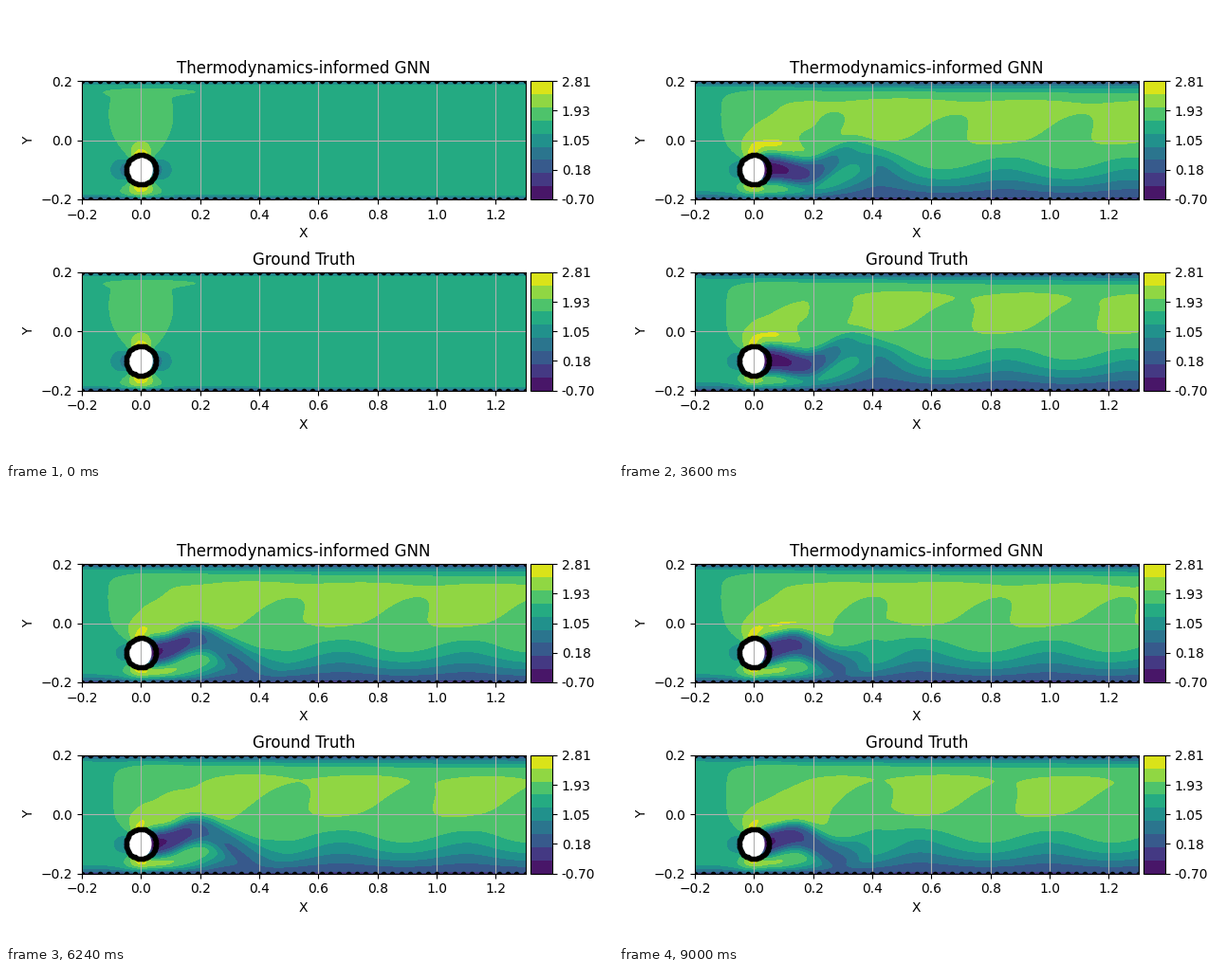
A matplotlib script that plays this animation: 640 by 480 pixels, repeating every 9030 ms.

```python
import numpy as np
import matplotlib.pyplot as plt
from matplotlib.animation import FuncAnimation
from matplotlib.colors import ListedColormap
from matplotlib.patches import Ellipse

W, H, DPI = 640, 480, 100
FRAMES, STEP = 301, 30
VMIN, VMAX, BANDS = -0.70, 2.81, 9
PERIOD, SPEED = 24.5, 0.0172      # shedding period (frames), drift per frame
K = 2 * np.pi / (PERIOD * SPEED)
R, CY = 0.05, -0.1                # cylinder radius and centre height

NX, NY = 235, 64
xs, ys = np.linspace(-0.2, 1.3, NX), np.linspace(-0.2, 0.2, NY)
X, Y = np.meshgrid(xs, ys)


def sig(v):
    return 0.5 * (1 + np.tanh(v / 2))


def bump(x0, y0, sx, sy):
    return np.exp(-((X - x0) / sx) ** 2 - ((Y - y0) / sy) ** 2)


def dipole(y0):
    dy = Y - y0
    r2 = np.maximum(X**2 + dy**2, R**2)
    return R**2 * (dy**2 - X**2) / r2**2


# Parts of the field that do not move
low, high = Y + 0.2, 0.2 - Y
DIP = dipole(CY)
POT = DIP + dipole(-0.3) + dipole(0.5)
STREAK = 0.07 * bump(0.08, 0.165, 0.2, 0.012)
CORE = 1.5 + 0.55 * sig((X + 0.03) / 0.05) + 0.13 * sig((X - 0.32) / 0.06)
TOP = np.tanh(high / (0.016 + 0.027 * (1 - np.exp(-(X + 0.2) / 0.5))))
LOW_W = 0.022 + 0.105 * sig((X - 0.27) / 0.05)
HUMP = (sig((X - 0.22) / 0.04) * (0.2 + 0.2 * np.exp(-((X - 0.4) / 0.15) ** 2))
        * np.exp(-(np.maximum(Y + 0.1, 0) / 0.08) ** 2))
NEAR = 1.2 * DIP * sig((0.03 - X) / 0.02)
CREST = 0.17 * sig((X - 0.22) / 0.04) * np.exp(-((Y - 0.04) / 0.07) ** 2)
SHEAR = 0.38 * bump(0.06, -0.015, 0.08, 0.03) + 0.1 * bump(0.09, 0.03, 0.1, 0.05)
ROLL = 0.24 * bump(0.16, 0.0, 0.11, 0.03)
JET = bump(0.05, -0.165, 0.07, 0.022)
DEFICIT = sig((X - 0.01) / 0.012) * np.exp(-(np.maximum(X - 0.08, 0) / 0.24) ** 2)
LIFT = CY + 0.015 * np.clip(X / 0.15, 0, 1)
SWAY = 0.045 * (1 - np.exp(-(np.maximum(X, 0) / 0.17) ** 2))


def startup(n):
    """Flow ahead of the wake front: potential flow with growing wall layers."""
    g = 1 - np.exp(-n / 25)
    walls = np.tanh(high / (0.012 + 0.042 * g)) * np.tanh(low / (0.012 + 0.06 * g))
    return (1.56 + 0.29 * g) * (1 + POT) * walls + STREAK * (1 - g)


def shedding(n, gain):
    """Developed wake with vortices drifting downstream."""
    xc = 0.256 + SPEED * (n - 208)
    ph = 2 * np.pi * (n - 208) / PERIOD
    grow = min(1, n / 40)
    wave = np.cos(K * (X - xc))
    lean = np.cos(K * (X - xc - 0.8 * (Y - 0.03)))
    floor = np.tanh(low * (1 - grow * HUMP * wave) / LOW_W)
    u = (CORE + gain) * TOP * floor + NEAR + SHEAR
    u += grow * (CREST * lean + ROLL * wave)
    u += (0.36 + 0.16 * np.cos(ph)) * JET * np.tanh(low / 0.015)
    mid = LIFT + grow * SWAY * np.cos(K * (X - xc + 0.075))
    depth = 2.33 + 0.1 * np.cos(ph - 2 * np.pi * 8 / PERIOD)
    u -= depth * DEFICIT * np.exp(-np.abs((Y - mid) / 0.047) ** 3) * np.tanh(low / 0.03)
    return u


def velocity(n, gain):
    front = sig((-0.2 + SPEED * n - X) / 0.06) * (1 - np.exp(-n / 4))
    return (1 - front) * startup(n) + front * shedding(n, gain)


cmap = ListedColormap(plt.get_cmap("viridis")((np.arange(BANDS) + 0.5) / BANDS))
fig = plt.figure(figsize=(W / DPI, H / DPI), dpi=DPI)
AX_W, AX_H = 467.6, 124.7
hx, hy = (xs[1] - xs[0]) / 2, (ys[1] - ys[0]) / 2
wall_x = np.linspace(-0.2, 1.3, 51)
ring = np.linspace(0, 2 * np.pi, 60)


def panel(title, mid):
    bottom = (H - mid - AX_H / 2) / H
    ax = fig.add_axes([80 / W, bottom, AX_W / W, AX_H / H])
    im = ax.imshow(velocity(0, 0), origin="lower", cmap=cmap, vmin=VMIN, vmax=VMAX,
                   extent=(-0.2 - hx, 1.3 + hx, -0.2 - hy, 0.2 + hy), aspect="auto",
                   interpolation="bilinear", interpolation_stage="data")
    hole = Ellipse((-0.002, CY), 0.084, 0.092, color="white", lw=0, zorder=1.2)
    ax.add_patch(hole)
    ax.plot(wall_x, 0 * wall_x + 0.2, "k.")
    ax.plot(wall_x, 0 * wall_x - 0.2, "k.")
    ax.plot(R * np.cos(ring), CY + R * np.sin(ring), "k.")
    ax.set(xlim=(-0.2, 1.3), ylim=(-0.2, 0.2), xlabel="X", ylabel="Y", title=title,
           xticks=np.arange(-0.2, 1.3, 0.2), yticks=[-0.2, 0, 0.2])
    ax.xaxis.set_major_formatter("{x:.1f}")
    ax.grid(True)
    cax = fig.add_axes([(85 + AX_W) / W, bottom, 0.05 * AX_W / W, AX_H / H])
    fig.colorbar(im, cax=cax, ticks=np.linspace(VMIN, VMAX, 5), format="%.2f")
    return im, hole


panels = [(*panel("Thermodynamics-informed GNN", 141.6), 0.02),
          (*panel("Ground Truth", 343.2), -0.02)]


def update(n):
    for im, hole, gain in panels:
        im.set_data(velocity(n, gain))
        hole.width = 0.084 if n < 4 else 0.076
    return [p[0] for p in panels]


anim = FuncAnimation(fig, update, frames=FRAMES, interval=STEP, repeat=True, repeat_delay=0)
plt.show()
```
